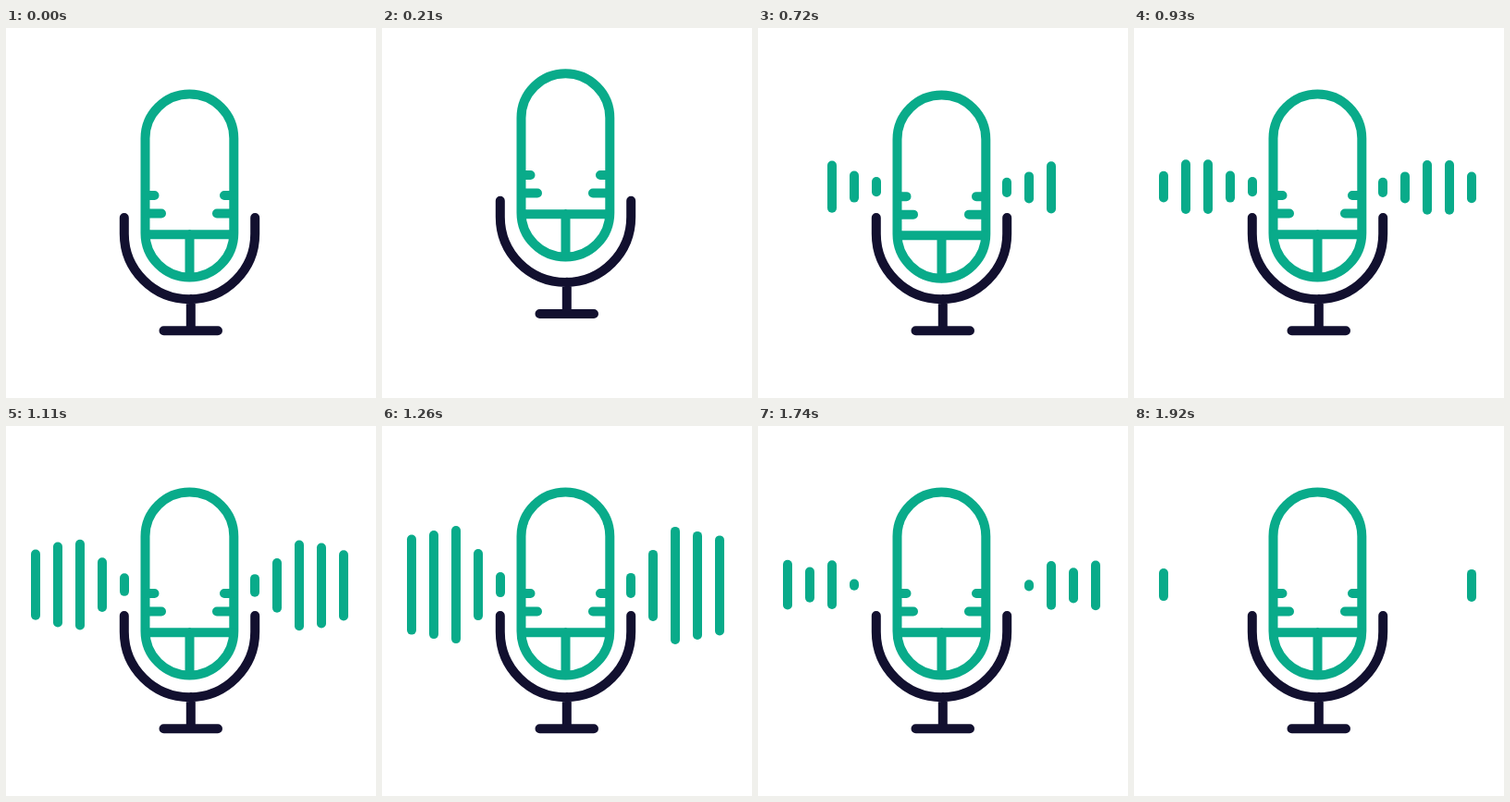
Animation of 400x400 px, one loop 1950 ms. Source, as an HTML page:

```html
<!DOCTYPE html>
<html lang="en">
<head>
<meta charset="utf-8">
<title>Microphone</title>
<style>
  html, body { margin: 0; width: 100%; height: 100%; overflow: hidden; background: #fff; }
  svg { display: block; width: 100vw; height: 100vh; }
  g { fill: none; stroke-width: 10; stroke-linecap: round; }
  .green { stroke: #09ab8a; }
  .navy { stroke: #12102f; }
</style>
</head>
<body>
<svg viewBox="0 0 400 400">
  <g id="stand" class="navy">
    <path d="M127.8 205V222.5A70.7 70.7 0 0 0 269.2 222.5V205M199.8 293V327.2M170.5 327.2H229"/>
  </g>
  <g id="body" class="green">
    <rect x="150.5" y="71.4" width="95.8" height="198.2" rx="47.9"/>
    <path d="M151 181H160.5M151 200.5H168M246 181H236M246 200.5H228M151 223.2H246M198.5 223V269"/>
  </g>
  <g id="waves" class="green"></g>
</svg>
<script>
const LOOP = 1950, STEP = 30, CAP = 10;
const BARS = 5, GAP = 24, STAGGER = 75, LIFE = 1170;
const peaks = [27, 77, 127, 117, 108];

// Eases through [time, value] pairs and holds the last value.
function sample(track, t) {
  const next = track.findIndex(([time]) => time > t);
  if (next < 0) return track[track.length - 1][1];
  if (next === 0) return track[0][1];
  const [t0, a] = track[next - 1], [t1, b] = track[next];
  return a + (b - a) * (1 - Math.cos(Math.PI * (t - t0) / (t1 - t0))) / 2;
}

const hop = (height, sink) => [[0, 0], [360, -height], [630, sink], [900, 0]];
const bodyHop = hop(35, 1.5), standHop = hop(29, 0);

// Each bar grows in, ripples, surges to its peak, ripples again and shrinks away.
function barLife(i) {
  const enter = 510 + STAGGER * i, exit = enter + LIFE;
  const before = 42 + 21 * Math.sin(1.31 * i - 1.7);
  const after = 51 + 13 * Math.sin(1.9 * i - 1.1);
  return {
    enter, exit,
    track: [
      [enter, CAP], [enter + 70, before], [930, before], [1260, peaks[i]],
      [1530, after], [exit - 110, after], [exit, CAP]
    ]
  };
}

const get = id => document.getElementById(id);
const body = get("body"), stand = get("stand");

function addLine(x) {
  const line = document.createElementNS("http://www.w3.org/2000/svg", "line");
  line.setAttribute("x1", x);
  line.setAttribute("x2", x);
  get("waves").append(line);
  return line;
}

const bars = Array.from({ length: BARS }, (_, i) => ({
  ...barLife(i),
  left: addLine(128 - GAP * i),
  right: addLine(269 + GAP * i)
}));

function setLine(line, y, half, shown) {
  line.setAttribute("visibility", shown ? "visible" : "hidden");
  line.setAttribute("y1", y - half);
  line.setAttribute("y2", y + half);
}

function draw(t) {
  body.setAttribute("transform", `translate(0 ${sample(bodyHop, t)})`);
  stand.setAttribute("transform", `translate(0 ${sample(standHop, t)})`);
  for (const { enter, exit, track, left, right } of bars) {
    const shown = t >= enter && t < exit;
    const half = Math.max(0.01, (sample(track, t) - CAP) / 2);
    setLine(left, 171.6, half, shown);
    setLine(right, 172.4, half, shown);
  }
}

const start = performance.now();
function tick() {
  const t = (performance.now() - start) % LOOP;
  draw(Math.floor(t / STEP) * STEP);
  requestAnimationFrame(tick);
}
tick();
</script>
</body>
</html>
```
